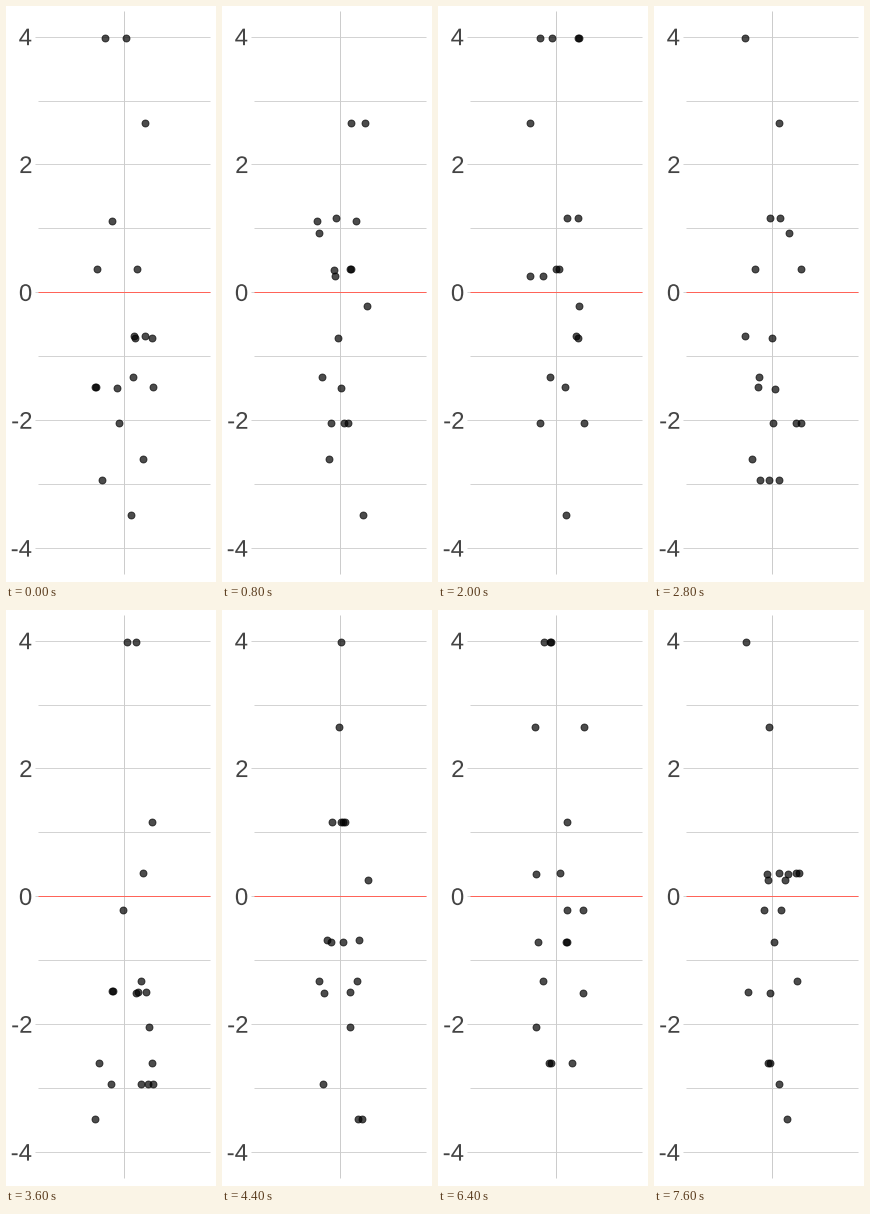
A matplotlib script that plays this animation: 210x576 px, repeating every 8 s.

```python
import matplotlib.pyplot as plt
import numpy as np
from matplotlib.animation import FuncAnimation
from matplotlib.patches import PathPatch
from matplotlib.textpath import TextPath
from matplotlib.transforms import Affine2D

WIDTH, HEIGHT, DPI = 210, 576, 100
PX = 72 / DPI                          # points per pixel
ZERO, UNIT = HEIGHT - 286.3, 63.93     # height of zero, pixels per unit
LEFT, RIGHT, CENTER, JITTER = 32, 204, 118, 29.3
LABEL_RIGHT = 25.3
FRAMES, INTERVAL = 20, 400

DATA = np.array([3.98, 2.65, 1.16, 1.12, 0.93, 0.37, 0.35, 0.25, -0.21, -0.69,
                 -0.71, -1.32, -1.48, -1.49, -1.52, -2.04, -2.61, -2.94, -3.49])


def height(value):
    return ZERO + UNIT * value


def resample(seed):
    """Bootstrap the data, with a uniform horizontal jitter."""
    rng = np.random.default_rng(seed)
    values = rng.choice(DATA, len(DATA))
    xs = CENTER + rng.uniform(-JITTER, JITTER, len(DATA))
    return np.column_stack([xs, height(values)])


fig = plt.figure(figsize=(WIDTH / DPI, HEIGHT / DPI), dpi=DPI, facecolor="white")
ax = fig.add_axes([0, 0, 1, 1])
ax.set(xlim=(0, WIDTH), ylim=(0, HEIGHT))
ax.axis("off")


def line(xs, ys, color):
    ax.plot(xs, ys, color=color, lw=PX, solid_capstyle="butt", zorder=1)


def label(level):
    """Axis number, right aligned and centred on its grid line."""
    glyphs = TextPath((0, 0), str(level), size=24, prop={"family": "Liberation Sans"})
    box = glyphs.get_extents()
    shift = Affine2D().translate(LABEL_RIGHT - box.x1, height(level) - 8.6)
    ax.add_patch(PathPatch(glyphs.transformed(shift), facecolor="#444444", lw=0))


for level in range(-4, 5):
    major = level % 2 == 0
    line([LEFT - 3 * major, RIGHT], [height(level)] * 2, "#d3d3d3")
    if major:
        label(level)
line([CENTER] * 2, [HEIGHT - 568, HEIGHT - 5], "#cccccc")
line([LEFT, RIGHT], [height(0)] * 2, "#ff6459")

dots = ax.scatter([], [], s=(7 * PX) ** 2, facecolor=(0, 0, 0, 0.7),
                  edgecolor=(0, 0, 0, 0.7), linewidth=0.9 * PX, zorder=3)


def update(i):
    dots.set_offsets(resample(i))
    return [dots]


anim = FuncAnimation(fig, update, frames=FRAMES, interval=INTERVAL,
                     repeat=True, repeat_delay=0)
plt.show()
```
